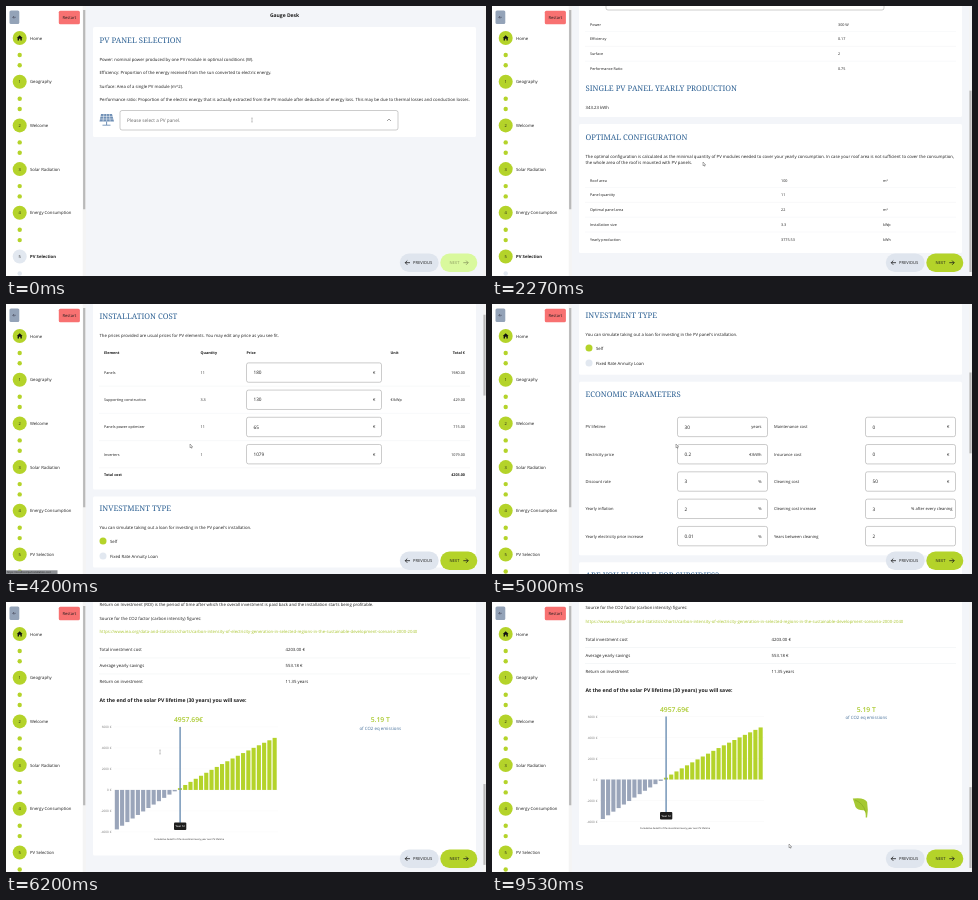
Animation, 480 px wide and 270 px high, one loop 9.94 s. Source, as an HTML page with a canvas:

```html
<!DOCTYPE html>
<html lang="en">
<head>
<meta charset="utf-8">
<title>PV calculator</title>
<style>
html, body { margin: 0; width: 100%; height: 100%; overflow: hidden; background: #f3f5f9; }
canvas { display: block; width: 480px; height: 270px; }
</style>
</head>
<body>
<canvas id="stage"></canvas>
<script>
const LOOP = 9940;
const LIME = '#b4d32a', BLUE = '#2f6294', INK = '#1c1c1c', GREY = '#e2e8f0', BG = '#f3f5f9';
const SELECTED = 1330, NEXT_PAGE = 3670;
const HEIGHT_A = 390, HEIGHT_B = 875;

const canvas = document.getElementById('stage');
const ratio = window.devicePixelRatio || 1;
canvas.width = 480 * ratio;
canvas.height = 270 * ratio;
const c = canvas.getContext('2d');

// Keys are [time, value, ...]; linear in between, held outside.
const scrollA = [[1470, 0], [1800, 70], [2130, 120]];
const scrollB = [[4130, 0], [4200, 22], [4600, 190], [4800, 215], [5000, 215], [5400, 365],
  [5600, 397.5], [5930, 430], [6200, 594.5], [6330, 605]];
const mousePath = [[330, 246, 114], [1200, 215, 138], [1330, 215, 138], [1900, 212, 158],
  [2330, 212, 158], [3270, 455, 257], [3670, 455, 257], [4130, 185, 142], [5000, 185, 142],
  [5600, 155, 152], [6200, 154, 150], [6950, 170, 150], [7150, 213, 157], [7500, 213, 157],
  [7950, 385, 112], [8900, 298, 244]];

function at(keys, t) {
  const i = keys.findIndex(k => k[0] > t);
  if (i === 0) return keys[0].slice(1);
  if (i < 0) return keys[keys.length - 1].slice(1);
  const a = keys[i - 1], b = keys[i], p = (t - a[0]) / (b[0] - a[0]);
  return a.slice(1).map((v, j) => v + (b[j + 1] - v) * p);
}
const ramp = (t, from, to) => Math.min(1, Math.max(0, (t - from) / (to - from)));

// Text is laid out at four times its size so that small type keeps its spacing.
function text(s, x, y, { size = 4.27, color = INK, weight = 400, align = 'left', font = '"Open Sans", sans-serif' } = {}) {
  c.save();
  c.translate(x, y + size * 0.36);
  c.scale(0.25, 0.25);
  c.font = `${weight} ${size * 4}px ${font}`;
  c.textRendering = 'geometricPrecision';
  c.textAlign = align;
  c.fillStyle = color;
  c.fillText(s, 0, 0);
  c.restore();
}
const small = (s, x, y, more) => text(s, x, y, { size: 3.73, ...more });
const label = (s, x, y, more) => text(s, x, y, { size: 4.06, ...more });
const heading = (s, y) => text(s, 93.5, y, { size: 7.75, color: BLUE, font: '"Noto Serif", serif' });

function rect(x, y, w, h, color) {
  c.fillStyle = color;
  c.fillRect(x, y, w, h);
}
function box(x, y, w, h, r, fill, stroke) {
  c.beginPath();
  c.roundRect(x, y, w, h, r);
  if (fill) { c.fillStyle = fill; c.fill(); }
  if (stroke) { c.strokeStyle = stroke; c.lineWidth = 0.5; c.stroke(); }
}
function dot(x, y, r, color) {
  c.beginPath();
  c.arc(x, y, r, 0, 7);
  c.fillStyle = color;
  c.fill();
}
function line(color, width, ...p) {
  c.beginPath();
  for (let i = 0; i < p.length; i += 2) c.lineTo(p[i], p[i + 1]);
  c.strokeStyle = color;
  c.lineWidth = width;
  c.stroke();
}
const card = (top, bottom) => box(87, top, 383, bottom - top, 1.5, '#fff');

function rows(list, columns, top, pitch) {
  list.forEach((cells, i) => {
    const y = top + i * pitch;
    cells.forEach((s, j) => small(s, columns[j], y));
    if (i < list.length - 1) line('#eceff2', 0.4, 93, y + pitch / 2, 464, y + pitch / 2);
  });
}
function input(x, y, w, value, unit) {
  box(x, y - 9.7, w, 19.4, 2, '#fff', '#999');
  text(value, x + 7, y, { size: 4.7 });
  label(unit, x + w - (unit.length > 5 ? 3 : 6), y, { align: 'right' });
}
function radio(y, s, on) {
  dot(97, y, 3.5, on ? LIME : GREY);
  text(s, 104, y);
}

function panelIcon() {
  c.fillStyle = '#6f8fb5';
  c.beginPath();
  [[95, 108], [106, 108], [108, 115.5], [93.5, 115.5]].forEach(p => c.lineTo(...p));
  c.fill();
  for (const y of [110.4, 113]) line('#fff', 0.5, 93, y, 108, y);
  for (const d of [-3.6, 0, 3.6]) line('#fff', 0.5, 100.6 + d * 0.75, 108, 100.6 + d, 115.5);
  line('#6f8fb5', 1, 100.6, 115.5, 100.6, 119);
  line('#6f8fb5', 0.9, 96.5, 119.2, 104.5, 119.2);
}

function selectionPage(t) {
  const chosen = t >= SELECTED;
  card(21, chosen ? 231 : 131);
  heading('PV PANEL SELECTION', 34);
  ['Power: nominal power produced by one PV module in optimal conditions (W).',
    'Efficiency: Proportion of the energy received from the sun converted to electric energy.',
    'Surface: Area of a single PV module (m^2).',
    'Performance ratio: Proportion of the electric energy that is actually extracted from the PV module after deduction of energy loss. This may be due to thermal losses and conduction losses.'
  ].forEach((s, i) => text(s, 93.5, 53.5 + i * 13.4));
  panelIcon();
  box(114, 104.5, 278, 19.5, 2, '#fff', '#999');
  text(chosen ? 'Monocrystalline 300 W' : 'Please select a PV panel.', 121, 114.2, { size: 4.7, color: chosen ? INK : '#666' });
  if (chosen) {
    line('#777', 0.7, 381, 113, 383, 115, 385, 113);
    rows([['Power', '300 W'], ['Efficiency', '0.17'], ['Surface', '2'], ['Performance Ratio', '0.75']], [98, 346], 138.2, 14.8);
    heading('SINGLE PV PANEL YEARLY PRODUCTION', 202.5);
    text('343.23 kWh', 93.5, 221.5);
    card(238, 367);
    heading('OPTIMAL CONFIGURATION', 251);
    text('The optimal configuration is calculated as the minimal quantity of PV modules needed to cover your yearly consumption. In case your roof area is not sufficient to cover the consumption,', 93.5, 270);
    text('the whole area of the roof is mounted with PV panels.', 93.5, 276.6);
    rows([['Roof area', '100', 'm²'], ['Panel quantity', '11', ''], ['Optimal panel area', '22', 'm²'],
      ['Installation size', '3.3', 'kWp'], ['Yearly production', '3775.53', 'kWh']], [98, 289, 391], 294.2, 14.8);
  } else {
    line('#777', 0.7, 381, 115, 383, 113, 385, 115);
    if (t >= 70) {
      c.save();
      c.globalAlpha = ramp(t, 50, 130);
      c.shadowColor = '#0003';
      c.shadowBlur = 4 * ratio;
      box(114, 126, 278, 50, 1.5, '#fff');
      c.shadowBlur = 0;
      if (t > 800) rect(114, 130, 278, 14, BG);
      ['Monocrystalline 300 W', 'Polycrystalline 270 W', 'Thin film 150 W'].forEach((s, i) => text(s, 121, 137 + i * 14));
      c.restore();
    }
  }
}

function chart(t) {
  const zero = 782.5, unit = 21 / 2000;
  for (let v = 6000; v >= -4000; v -= 2000) {
    const y = zero - v * unit;
    text(v + ' €', 105.5, y, { size: 3.1, color: '#777', align: 'right' });
    line('#f0f0f0', 0.3, 108, y, 272, y);
  }
  for (let year = 0; year <= 30; year++) {
    const value = -3760 + 352.1 * year - 2.05 * year * year;
    rect(108.8 + year * 5.26, zero, 4.1, -value * unit, value < 0 ? '#9aa5ba' : LIME);
  }
  rect(173.4, 719.5, 1.4, 96, '#6d8fb3');
  box(168, 815, 12.3, 7.6, 1, '#1d1d1d');
  text('Year 12', 174.1, 818.8, { size: 2.6, color: '#fff', weight: 600, align: 'center' });
  text('Cumulative benefit of the investment every year over PV lifetime', 183, 831.5, { size: 2.35, align: 'center' });

  if (t > 7130 && t < 7600) {
    c.globalAlpha = 1 - ramp(t, 7330, 7600);
    box(195, 755.5, 22, 12.5, 1.5, '#222');
    text('Year 18', 197.5, 759.5, { size: 2.8, color: '#fff' });
    text('1913.60 €', 197.5, 764.3, { size: 2.8, color: '#fff' });
    c.globalAlpha = 1;
  }
}

function leaf(t) {
  const grow = ramp(t, 8000, 9000);
  if (!grow) return;
  const scale = 1 - (1 - grow) ** 3;
  c.save();
  c.translate(374.5, 820.5);
  c.rotate(-0.12 * Math.sin(ramp(t, 8900, 9530) * Math.PI));
  c.scale(scale, scale);
  c.beginPath();
  c.moveTo(-13.7, -19);
  c.quadraticCurveTo(-2, -20.5, 0.6, -15.5);
  c.quadraticCurveTo(2, -8, 0.6, 0);
  c.lineTo(-0.8, 0);
  c.quadraticCurveTo(-0.4, -5, -2.5, -7.3);
  c.quadraticCurveTo(-8.5, -7, -11, -10.5);
  c.quadraticCurveTo(-12.3, -15, -13.7, -19);
  c.fillStyle = '#a5c832';
  c.fill();
  c.beginPath();
  c.moveTo(-11.5, -17.5);
  c.quadraticCurveTo(-3.5, -14.5, -1, -6);
  c.strokeStyle = '#86aa25';
  c.lineWidth = 0.7;
  c.stroke();
  c.restore();
}

function investmentPage(t) {
  card(21, 208);
  heading('INSTALLATION COST', 34.5);
  text('The prices provided are usual prices for PV elements. You may edit any price as you see fit.', 93.5, 53.5);
  const bold = { weight: 700 }, boldRight = { weight: 700, align: 'right' };
  ['Element', 'Quantity', 'Price', 'Unit'].forEach((s, i) => small(s, [98, 194.5, 240.5, 384.5][i], 70.7, bold));
  small('Total €', 459, 70.7, boldRight);
  [['Panels', '11', '180', '', '1980.00'], ['Supporting construction', '3.3', '130', '€/kWp', '429.00'],
    ['Panels power optimizer', '11', '65', '', '715.00'], ['Inverters', '1', '1079', '', '1079.00']
  ].forEach(([name, count, price, unit, total], i) => {
    const y = 91 + i * 27.2;
    small(name, 98, y);
    small(count, 194.5, y);
    input(240.5, y, 135, price, '€');
    small(unit, 384.5, y);
    small(total, 459, y, { align: 'right' });
    line('#eceff2', 0.4, 93, y + 13.6, 464, y + 13.6);
  });
  small('Total cost', 98, 193.5, bold);
  small('4203.00', 459, 193.5, boldRight);

  card(215, 286);
  heading('INVESTMENT TYPE', 227);
  text("You can simulate taking out a loan for investing in the PV panel's installation.", 93.5, 246);
  radio(259.4, 'Self', true);
  radio(274.4, 'Fixed Rate Annuity Loan', false);

  card(293, 466.5);
  heading('ECONOMIC PARAMETERS', 306);
  [['PV lifetime', '30', 'years', 'Maintenance cost', '0', '€'],
    ['Electricity price', '0.2', '€/kWh', 'Insurance cost', '0', '€'],
    ['Discount rate', '3', '%', 'Cleaning cost', '50', '€'],
    ['Yearly inflation', '2', '%', 'Cleaning cost increase', '3', '% after every cleaning'],
    ['Yearly electricity price increase', '0.01', '%', 'Years between cleaning', '2', '']
  ].forEach(([a, v, u, b, w, z], i) => {
    const y = 338.3 + i * 27.3;
    label(a, 93.5, y);
    input(185.5, y, 90, v, u);
    label(b, 282, y);
    input(373.5, y, 90, w, z);
  });

  card(473.5, 531.8);
  heading('ARE YOU ELIGIBLE FOR SUBSIDIES?', 486.7);
  radio(505.6, 'Yes', false);
  radio(520.6, 'No', true);

  card(538, 848);
  heading('BENEFITS OF THE PV INVESTMENT', 551.5);
  ['Total investment includes the cost of PV panel components (panels, supporting construction, inverter, cables) and the metering systems.',
    'Yearly savings are the average annual benefit between electricity bills without PV installation and after PV installation.',
    'Return on Investment (ROI) is the period of time after which the overall investment is paid back and the installation starts being profitable.',
    'Source for the CO2 factor (carbon intensity) figures:'
  ].forEach((s, i) => text(s, 93.5, 570.6 + i * 13.4));
  text('https://www.iea.org/data-and-statistics/charts/carbon-intensity-of-electricity-generation-in-selected-regions-in-the-sustainable-development-scenario-2000-2040', 93.5, 624.5, { color: '#a9c52f' });
  [['Total investment cost', '4203.00 €'], ['Average yearly savings', '553.18 €'], ['Return on investment', '11.35 years']].forEach(([a, b], i) => {
    const y = 642.5 + i * 16;
    text(a, 93.5, y);
    text(b, 279.5, y);
    if (i < 2) line('#e6eaee', 0.4, 93, y + 8, 464, y + 8);
  });
  text('At the end of the solar PV lifetime (30 years) you will save:', 93.5, 693, { size: 5.1, weight: 700 });
  const figure = { size: 6.8, weight: 600, color: '#a9c92c', align: 'center' };
  text('4957.69€', 182.5, 712.5, figure);
  text('5.19 T', 374.3, 712.5, figure);
  text('of CO2 eq emissions', 374.3, 720.5, { size: 4.4, color: '#456f9a', align: 'center' });
  chart(t);
  leaf(t);
}

function thumb(x, scroll, height) {
  rect(x, 0, 3, 270, '#f4f4f4');
  if (height > 270) rect(x + 0.4, 4 + scroll / height * 262, 2.2, 262 * 270 / height, '#b9b9b9');
}

function sidebar(t) {
  rect(0, 0, 77, 270, '#fff');
  box(3.5, 4.5, 9.8, 13.5, 1.5, '#94a3b8');
  line('#334', 0.5, 9.8, 11.3, 6.8, 11.3);
  line('#334', 0.5, 8, 10, 6.8, 11.3, 8, 12.6);
  box(52.8, 4.7, 21.1, 13.6, 1.5, '#f87171');
  text('Restart', 63.3, 11.5, { size: 4.1, align: 'center' });
  ['Home', 'Geography', 'Welcome', 'Solar Radiation', 'Energy Consumption', 'PV Selection'].forEach((name, i) => {
    const y = 32 + i * 43.7, last = i === 5;
    dot(13.7, y, 7, last && t < SELECTED ? GREY : LIME);
    if (i) text(i, 13.7, y, { size: 4, align: 'center' });
    else {
      c.fillStyle = '#111';
      c.beginPath();
      [[10.8, 32], [13.7, 29.2], [16.6, 32], [15.8, 32], [15.8, 34.6], [14.4, 34.6], [14.4, 32.8],
        [13, 32.8], [13, 34.6], [11.6, 34.6], [11.6, 32]].forEach(p => c.lineTo(...p));
      c.fill();
    }
    text(name, 24, y, { size: 4.25, weight: last && t < NEXT_PAGE ? 700 : 400 });
    for (const d of [17, 27.3]) dot(13.7, y + d, 2.2, last && t < NEXT_PAGE ? GREY : LIME);
  });
  thumb(76.7, 0, 355);
}

function buttons(t) {
  const hover = t >= 3250 && t < 3800;
  const ready = t >= SELECTED;
  box(393.8, 247.5, 38.9, 18.4, 9.2, '#dfe5ee');
  line(INK, 0.8, 404, 256.7, 399.2, 256.7);
  line(INK, 0.8, 401.3, 254.6, 399.2, 256.7, 401.3, 258.8);
  text('PREVIOUS', 407, 256.7, { size: 4.1 });
  box(434.3, 247.5, 37, 18.4, 9.2, !ready ? '#d9f99d' : hover ? '#a6c41f' : LIME);
  const ink = ready ? INK : '#8b9a60';
  text('NEXT', 443.5, 256.7, { size: 4.1, color: ink });
  line(ink, 0.8, 457.3, 256.7, 462.2, 256.7);
  line(ink, 0.8, 460.1, 254.6, 462.2, 256.7, 460.1, 258.8);
}

function pointer(t) {
  const [x, y] = at(mousePath, t);
  if (t < 330 || (t > 5400 && t < 6950)) {
    line('#777', 0.4, x, y - 2, x, y + 2);
    line('#777', 0.4, x - 0.7, y - 2, x + 0.7, y - 2);
    line('#777', 0.4, x - 0.7, y + 2, x + 0.7, y + 2);
    return;
  }
  c.beginPath();
  [[0, 0], [0, 3.8], [0.9, 3], [1.6, 4.3], [2.1, 4], [1.5, 2.8], [2.6, 2.7]].forEach(([dx, dy]) => c.lineTo(x - 1 + dx, y - 2 + dy));
  c.closePath();
  c.fillStyle = '#fff';
  c.fill();
  c.strokeStyle = '#222';
  c.lineWidth = 0.35;
  c.stroke();
}

function draw(t) {
  const first = t < NEXT_PAGE;
  const [scroll] = at(first ? scrollA : scrollB, t);
  c.setTransform(ratio, 0, 0, ratio, 0, 0);
  rect(0, 0, 480, 270, BG);
  c.save();
  c.translate(0, -scroll);
  text('Gauge Desk', 278.5, 9, { size: 5, weight: 700, align: 'center' });
  (first ? selectionPage : investmentPage)(t);
  c.restore();
  thumb(477, scroll, !first ? HEIGHT_B : t < SELECTED ? 270 : HEIGHT_A);
  buttons(t);
  sidebar(t);
  if (t >= 3470 && t < 4530) {
    rect(0, 266.3, 51.5, 3.7, '#8d9094');
    text('https://localhost/pv/installation-cost', 1, 268.2, { size: 2.6, color: '#222' });
  }
  pointer(t);
}

function frame() {
  draw(performance.now() % LOOP);
  requestAnimationFrame(frame);
}
frame();
</script>
</body>
</html>
```
